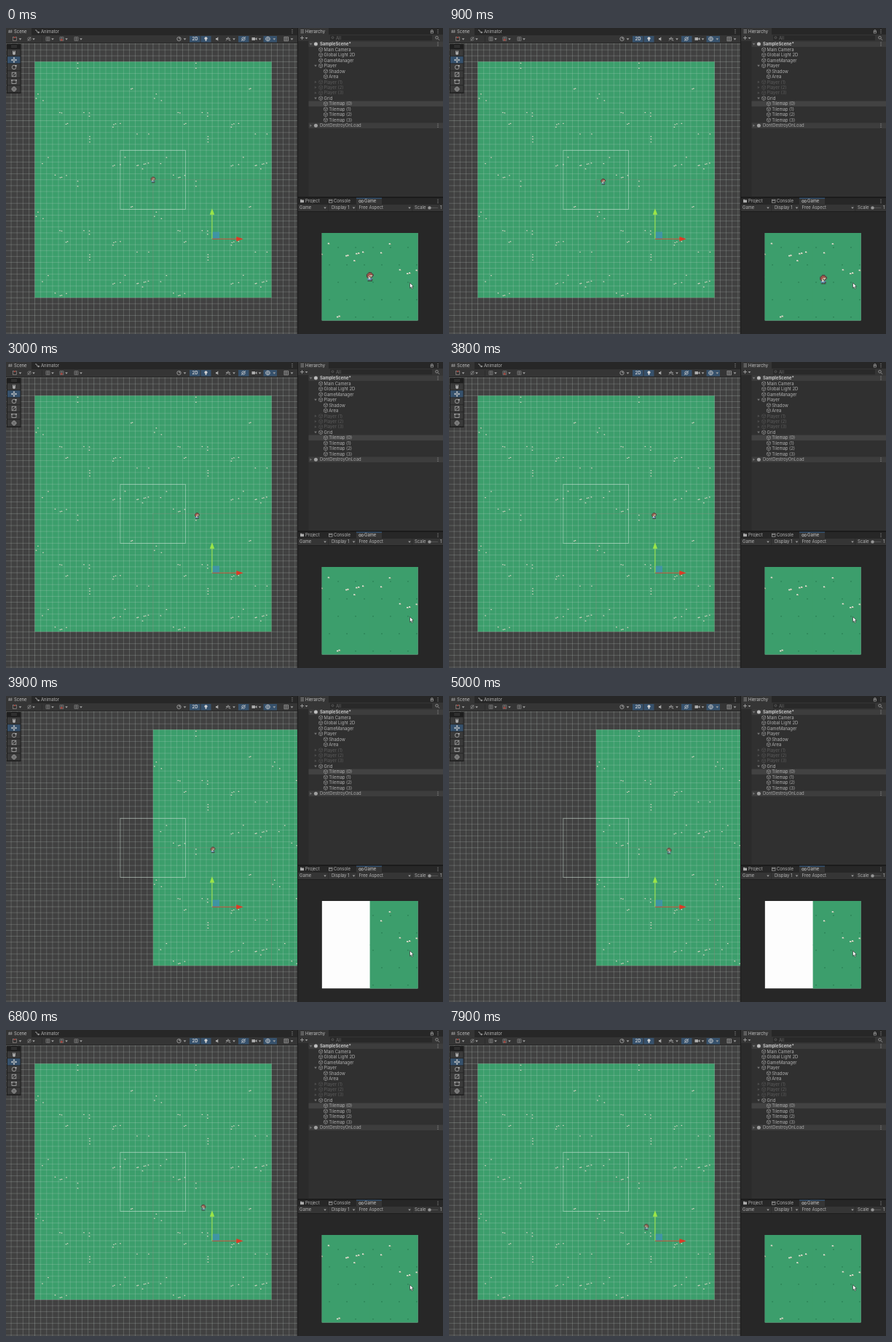
Write an HTML page with a canvas that moves like this. It is 600 px wide and 421 px high and loops after 8000 ms.

```html
<!DOCTYPE html>
<html lang="en">
<head>
<meta charset="utf-8">
<title>Endless field</title>
<style>
html, body { margin: 0; width: 600px; height: 421px; overflow: hidden; background: #282828; }
canvas { display: block; }
</style>
</head>
<body>
<canvas id="stage" width="600" height="421"></canvas>
<script>
const ctx = document.getElementById('stage').getContext('2d');
const LOOP = 8000, STEP = 100;
const CELL = 8.12, MAP = CELL * 20, LEFT = 39.5, TOP = 46.3;
const CENTER = { x: LEFT + MAP, y: TOP + MAP };
const VIEW = { x: 433.6, y: 282, w: 132, h: 120.6, zoom: 1.475 };
const GREEN = '#3c9e6c', BAR = '#353535', TAB = '#272727', ACTIVE = '#36516c', ICON = '#acacac';

// Flowers of one tilemap, as "x,y" inside the map.
const flowers = ('59,2.5 59,9.5 132.3,38.1 134,37.4 4.5,45 2,51 11.5,54 34.5,70.5 37,71 ' +
  '67.5,70.5 75,71 75,75.5 43,86.5 45,85.5 117.5,85.5 108.5,87 111,86 107.5,90.5 ' +
  '75.5,103.5 75.5,107 75.5,111 140.5,100 156.5,100 18.5,132.3 124,132 10.5,140.7 ' +
  '107.5,144 109.5,143 117.5,142 140.5,143.5 142,143 150,141.5 152,141 156,140 ' +
  '148,148 28,156.5 35,160 37,159.5 43.5,157').split(' ').map(p => p.split(',').map(Number));

// Player path: time, x, y.
const path = [
  [0, 202, 208.8], [450, 202, 208.8], [600, 204.5, 211.3], [4700, 303.3, 211.7],
  [4930, 303.3, 211.9], [6100, 283, 232], [6800, 271, 244.2], [7900, 271, 271], [8000, 271, 273.4]
];

const sprite = [
  '..kkk..', '.krrrk.', 'krrrrrk', 'krrsssk', 'krsksk.',
  '.kssk..', '.bwwbb.', '.bbbbk.', '..k.k..'
];
const ink = { k: '#56363c', r: '#b04a44', s: '#e9c8b4', w: '#dfe4e8', b: '#5d83b0' };

function rect(x, y, w, h, color) {
  ctx.fillStyle = color;
  ctx.fillRect(x, y, w, h);
}

function line(points, color = ICON, width = 0.8, close = false) {
  ctx.strokeStyle = color;
  ctx.lineWidth = width;
  ctx.beginPath();
  for (let i = 0; i < points.length; i += 2) ctx.lineTo(points[i], points[i + 1]);
  if (close) ctx.closePath();
  ctx.stroke();
}

function poly(points, color) {
  ctx.fillStyle = color;
  ctx.beginPath();
  for (let i = 0; i < points.length; i += 2) ctx.lineTo(points[i], points[i + 1]);
  ctx.fill();
}

function box(x, y, w, h, color = ICON, width = 0.8) {
  ctx.strokeStyle = color;
  ctx.lineWidth = width;
  ctx.strokeRect(x, y, w, h);
}

function dot(x, y, r, color) {
  ctx.fillStyle = color;
  ctx.beginPath();
  ctx.arc(x, y, r, 0, 7);
  ctx.fill();
}

function ring(x, y, r, color = ICON, width = 0.8) {
  ctx.strokeStyle = color;
  ctx.lineWidth = width;
  ctx.beginPath();
  ctx.arc(x, y, r, 0, 7);
  ctx.stroke();
}

function label(str, x, y, color = '#b4b4b4', weight = 400) {
  ctx.font = weight + ' 5.9px Inter, "Open Sans", sans-serif';
  ctx.textBaseline = 'middle';
  ctx.fillStyle = color;
  ctx.fillText(str, x, y + 0.4);
}

function caret(x, y) {
  poly([x - 1.8, y - 1, x + 1.8, y - 1, x, y + 1.4], '#a0a0a0');
}

function kebab(x, y) {
  for (const d of [-2.2, 0, 2.2]) rect(x - 0.5, y + d - 0.5, 1, 1, '#a0a0a0');
}

function clip(x, y, w, h, draw) {
  ctx.save();
  ctx.beginPath();
  ctx.rect(x, y, w, h);
  ctx.clip();
  draw();
  ctx.restore();
}

function playerAt(t) {
  let i = 1;
  while (i < path.length - 1 && path[i][0] < t) i++;
  const [t0, x0, y0] = path[i - 1], [t1, x1, y1] = path[i];
  const k = (t - t0) / (t1 - t0);
  return { x: x0 + (x1 - x0) * k, y: y0 + (y1 - y0) * k, flip: t > 4930 };
}

// Maps overlap their right and lower neighbours slightly so no seam shows.
function drawMap(x, y) {
  const w = x > LEFT + MAP * 1.5 || x < CENTER.x - 1 ? MAP + 0.4 : MAP;
  const h = y < CENTER.y - 1 ? MAP + 0.4 : MAP;
  rect(x, y, x === CENTER.x ? MAP + 0.4 : w, h, GREEN);
}

function drawGrass(x, y) {
  for (let r = 0; r < 20; r += 2)
    for (let c = 0; c < 20; c += 2)
      rect(x + (c + 0.3 + r / 2 % 2) * CELL, y + (r + 0.6) * CELL, 1.1, 0.9, 'rgba(20,90,55,.45)');
}

function drawFlowers(x, y) {
  for (const [fx, fy] of flowers) {
    rect(x + fx - 0.8, y + fy - 1, 1.4, 1.1, '#eeeade');
    rect(x + fx + 0.4, y + fy - 0.5, 0.6, 0.8, '#cda58c');
  }
}

function eachMap(moved, draw) {
  for (const col of [0, 1])
    for (const row of [0, 1])
      draw(LEFT + (col || !moved ? col : 2) * MAP, TOP + row * MAP);
}

function drawPlayer({ x, y, flip }) {
  const u = 0.94;
  ctx.save();
  ctx.translate(x, y);
  if (flip) ctx.scale(-1, 1);
  rect(-2.4, 3.4, 4.8, 1.1, 'rgba(20,60,40,.4)');
  sprite.forEach((row, j) => [...row].forEach((c, i) => {
    if (ink[c]) rect((i - 3.5) * u, (j - 4.5) * u, u + 0.05, u + 0.05, ink[c]);
  }));
  ctx.restore();
}

function drawGrid() {
  for (let i = -5; i < 50; i++) {
    const color = `rgba(215,225,220,${i % 10 ? 0.21 : 0.25})`;
    const p = i * CELL;
    rect(LEFT + p - 0.4, 21, 0.9, 400, color);
    rect(0, TOP + p - 0.4, 400, 0.9, color);
  }
}

function drawGizmo() {
  const { x, y } = CENTER;
  box(x, y, MAP, MAP, 'rgba(90,80,60,.25)', 0.8);
  box(156.9, 168.3, 89.6, 81.2, 'rgba(225,240,230,.55)', 0.8);
  rect(283.2, 280.5, 9.8, 9.7, 'rgba(62,145,180,.75)');
  line([282.9, 290, 282.9, 256], '#9be548', 1);
  poly([279.8, 256.8, 286.2, 256.8, 282.9, 248.3], '#9be548');
  line([283, 290.2, 317, 290.2], '#c44a30', 1);
  poly([316.3, 287, 316.3, 293.5, 325.8, 290.2], '#dc3a26');
}

function drawPalette() {
  rect(1, 22, 19.5, 68, '#1e1e1e');
  line([7, 24.5, 15, 24.5], '#555', 0.6);
  line([7, 26.3, 15, 26.3], '#555', 0.6);
  for (let i = 0; i < 6; i++)
    rect(2, 29.2 + i * 10, 17.5, 9.3, i === 1 ? ACTIVE : '#3a3a3a');
  const x = 11;
  dot(x, 35, 2, ICON);
  for (const d of [-1.5, 0, 1.5]) line([x + d, 34.5, x + d, 31.3], ICON, 0.9);
  line([x - 3.5, 44, x + 3.5, 44], '#ccc');
  line([x, 40.5, x, 47.5], '#ccc');
  for (const s of [-1, 1]) {
    poly([x + 4 * s, 44, x + 2 * s, 42.6, x + 2 * s, 45.4], '#ccc');
    poly([x, 44 + 4 * s, x - 1.4, 44 + 2 * s, x + 1.4, 44 + 2 * s], '#ccc');
  }
  ring(x, 54, 2.8);
  rect(x + 1.6, 51, 2, 2, ICON);
  box(x - 2.8, 61.2, 5.6, 5.6);
  line([x - 1.5, 65.5, x + 2.5, 61.5]);
  box(x - 3, 71.8, 6, 4.6);
  for (const d of [-3, 3]) rect(x + d - 0.8, 71, 1.6, 1.6, ICON);
  ring(x, 84, 2.8);
  line([x - 3.4, 84, x + 3.4, 84]);
  line([x, 80.6, x, 87.4]);
}

function drawSceneBars() {
  rect(0, 0, 400, 10, TAB);
  rect(0, 0, 35, 10, BAR);
  for (const x of [4.6, 7.1]) line([x + 0.4, 2.5, x - 0.4, 7], ICON, 0.6);
  for (const y of [3.9, 5.7]) line([3, y, 8.7, y], ICON, 0.6);
  label('Scene', 11, 4.7, '#c4c4c4');
  line([40, 3, 42, 3, 43, 6, 45, 6]);
  poly([44.2, 4.5, 46.5, 6, 44.2, 7.5], ICON);
  label('Animator', 48, 4.7);
  kebab(393, 4.7);
  rect(0, 10, 400, 11, BAR);
  rect(0, 20.3, 400, 0.7, '#232323');

  box(9.5, 12.5, 5, 5, '#988e8a', 0.7);
  rect(11, 12, 2, 2, '#a0443c');
  caret(19.5, 15.3);
  line([30, 17.5, 34, 12.5]);
  ring(32, 15, 2.3, '#909090', 0.6);
  caret(38, 15.3);
  rect(49, 11.5, 0.7, 8, '#292929');
  for (const x of [55, 74, 94]) {
    for (const d of [0, 2.5, 5]) {
      line([x + d, 12.5, x + d, 17.5], '#909090', 0.6);
      line([x, 12.5 + d, x + 5, 12.5 + d], '#909090', 0.6);
    }
    caret(x + 9, 15.3);
  }
  rect(75, 15, 2.6, 2.6, '#a0443c');

  ring(237.5, 15, 2.7);
  dot(238.4, 14.2, 1.4, '#777');
  caret(245.5, 15.3);
  for (const [x, w] of [[252, 14.5], [267.5, 14], [319, 14.5], [353.5, 18.5]]) rect(x, 11, w, 8.6, ACTIVE);
  label('2D', 255.6, 15, '#d4d4d4', 600);
  dot(274.5, 14.3, 2, '#d0d0d0');
  rect(273.7, 16, 1.6, 2, '#d0d0d0');
  poly([288, 14, 289.5, 14, 291.3, 12.3, 291.3, 17.8, 289.5, 16.2, 288, 16.2], ICON);
  line([302, 17.5, 305, 12.5, 308, 17.5, 302, 14.4, 308, 14.4], ICON, 0.6);
  caret(313, 15.3);
  ring(326, 15, 2.2, '#d0d0d0');
  line([323, 17.8, 329, 12.2], '#d0d0d0');
  rect(337.5, 13, 4.5, 4, ICON);
  poly([342, 15, 344.5, 13, 344.5, 17], ICON);
  caret(348.5, 15.3);
  ring(359.5, 15, 2.8, '#d0d0d0');
  line([356.5, 15, 362.5, 15], '#d0d0d0', 0.6);
  line([359.5, 12, 359.5, 18], '#d0d0d0', 0.6);
  caret(368.3, 15.3);
  box(382, 12.3, 5.5, 5.5, ICON, 0.7);
  line([384.7, 12.3, 384.7, 17.8], ICON, 0.6);
  line([382, 15, 387.5, 15], ICON, 0.6);
  caret(392.5, 15.3);
}

function cube(x, y, color) {
  line([x, y - 2.8, x + 2.5, y - 1.5, x + 2.5, y + 1.5, x, y + 2.8, x - 2.5, y + 1.5, x - 2.5, y - 1.5], color, 0.6, true);
  line([x - 2.5, y - 1.5, x, y, x + 2.5, y - 1.5], color, 0.6);
  line([x, y, x, y + 2.8], color, 0.6);
}

function fold(x, y, open, color = '#747474') {
  if (open) poly([x - 1.8, y - 1.2, x + 1.8, y - 1.2, x, y + 1.6], color);
  else poly([x - 1.2, y - 1.8, x - 1.2, y + 1.8, x + 1.6, y], color);
}

// Name, depth, fold state (1 open, 0 closed), dimmed.
const rows = [
  ['Main Camera', 0], ['Global Light 2D', 0], ['GameManager', 0], ['Player', 0, 1],
  ['Shadow', 1], ['Area', 1], ['Player (1)', 0, 0, 1], ['Player (2)', 0, 0, 1],
  ['Player (3)', 0, 0, 1], ['Grid', 0, 1], ['Tilemap (0)', 1], ['Tilemap (1)', 1],
  ['Tilemap (2)', 1], ['Tilemap (3)', 1]
];

function drawHierarchy() {
  rect(400, 0, 200, 421, '#1c1c1c');
  rect(401, 0, 199, 9, TAB);
  rect(401, 0, 42, 9, BAR);
  for (const d of [2.7, 4.7, 6.7]) line([404.5, d, 409, d], ICON, 0.7);
  label('Hierarchy', 411, 4.7, '#c4c4c4');
  box(583.2, 4.2, 3.2, 2.8, ICON, 0.7);
  ring(584.8, 3.6, 1.2, ICON, 0.6);
  kebab(593, 4.7);
  rect(401, 9, 199, 9.3, BAR);
  line([404, 13.6, 409, 13.6]);
  line([406.5, 11.1, 406.5, 16.1]);
  caret(412.5, 13.9);
  rect(445, 10.2, 140, 7, '#292929');
  ring(448.5, 13.2, 1.4, '#747474', 0.6);
  label('All', 453, 13.6, '#6a6a6a');
  ring(591.5, 13.2, 1.8, ICON, 0.7);
  line([593, 14.7, 595, 16.7]);

  rect(401, 18.3, 199, 214, '#303030');
  rect(401, 18.3, 14.5, 214, '#2b2b2b');
  rect(415.5, 18.3, 184.5, 7.6, '#3d3d3d');
  fold(418.5, 22.1, true);
  dot(425.4, 22.1, 2.5, '#bebebe');
  label('SampleScene*', 431, 22.1, '#cacaca', 700);
  kebab(593, 22.1);
  rows.forEach(([name, depth, open, dim], i) => {
    const y = 29.6 + i * 7.46, x = 432.2 + depth * 6.7;
    if (name === 'Tilemap (0)') rect(415.5, y - 3.7, 184.5, 7.4, '#424242');
    if (open !== undefined) fold(425, y, open, dim ? '#4e4e4e' : '#747474');
    cube(x, y, dim ? '#545454' : '#a0a0a0');
    label(name, x + 4.4, y, dim ? '#5c5c5c' : '#b2b2b2');
  });
  rect(415.5, 130.4, 184.5, 7.6, '#3d3d3d');
  fold(418.5, 134.2, false);
  dot(425.4, 134.2, 2.5, '#a0a0a0');
  label('DontDestroyOnLoad', 431, 134.2, '#a8a8a8');
  kebab(593, 134.2);
}

function drawGameBars() {
  rect(400, 232.3, 200, 1.5, '#1a1a1a');
  rect(401, 233.8, 199, 9, TAB);
  rect(481, 233.8, 35, 9, BAR);
  rect(481, 233.8, 35, 0.8, '#34679c');
  rect(404, 236.5, 5, 3.7, ICON);
  rect(404, 235.8, 2.2, 1, ICON);
  label('Project', 411, 238.3);
  box(443.5, 236.2, 4.5, 4, ICON, 0.7);
  line([444, 237.5, 447.5, 237.5], ICON, 0.6);
  label('Console', 450, 238.3);
  for (const x of [486, 489.2]) ring(x, 238.4, 1.5, '#c0c0c0');
  label('Game', 492, 238.3, '#cccccc');
  kebab(593, 238.3);
  rect(401, 242.8, 199, 9.2, BAR);
  label('Game', 403, 247.3);
  caret(438, 247.4);
  label('Display 1', 447, 247.3);
  caret(477.5, 247.4);
  label('Free Aspect', 484.5, 247.3);
  caret(554, 247.4);
  for (const x of [442.5, 481, 557.5]) rect(x, 243, 0.6, 8.8, '#292929');
  label('Scale', 561, 247.3);
  line([580, 247.4, 593, 247.4], '#5e5e5e');
  dot(581.5, 247.4, 2.2, '#959595');
  label('1', 596, 247.3);
  rect(401, 252, 199, 0.8, '#1c1c1c');
  rect(401, 252.8, 199, 168.2, '#272727');
}

function drawCursor(x, y) {
  const shape = [x, y, x, y + 7.2, x + 1.6, y + 5.7, x + 2.8, y + 8.3, x + 4, y + 7.7, x + 2.9, y + 5.2, x + 5, y + 5];
  poly(shape, '#fff');
  line(shape, '#222', 0.6, true);
}

function draw(t) {
  const player = playerAt(t);
  const moved = t >= 3850 && t < 6150;

  clip(0, 21, 400, 400, () => {
    rect(0, 21, 400, 400, '#414141');
    eachMap(moved, drawMap);
    drawGrid();
    eachMap(moved, drawFlowers);
    drawPlayer(player);
    drawGizmo();
  });
  drawPalette();
  drawSceneBars();
  drawHierarchy();
  drawGameBars();

  clip(VIEW.x, VIEW.y, VIEW.w, VIEW.h, () => {
    rect(VIEW.x, VIEW.y, VIEW.w, VIEW.h, '#fdfdfd');
    ctx.translate(VIEW.x + VIEW.w / 2, VIEW.y + VIEW.h / 2 - 0.3);
    ctx.scale(VIEW.zoom, VIEW.zoom);
    ctx.translate(-CENTER.x, -CENTER.y);
    eachMap(moved, drawMap);
    eachMap(moved, drawGrass);
    eachMap(moved, drawFlowers);
    drawPlayer(player);
  });
  drawCursor(554.5, 350.6);
}

const start = performance.now();
let last = -1;
function tick(now) {
  const t = Math.floor(Math.max(0, now - start) % LOOP / STEP) * STEP;
  if (t !== last) draw(last = t);
  requestAnimationFrame(tick);
}
tick(start);
</script>
</body>
</html>
```
